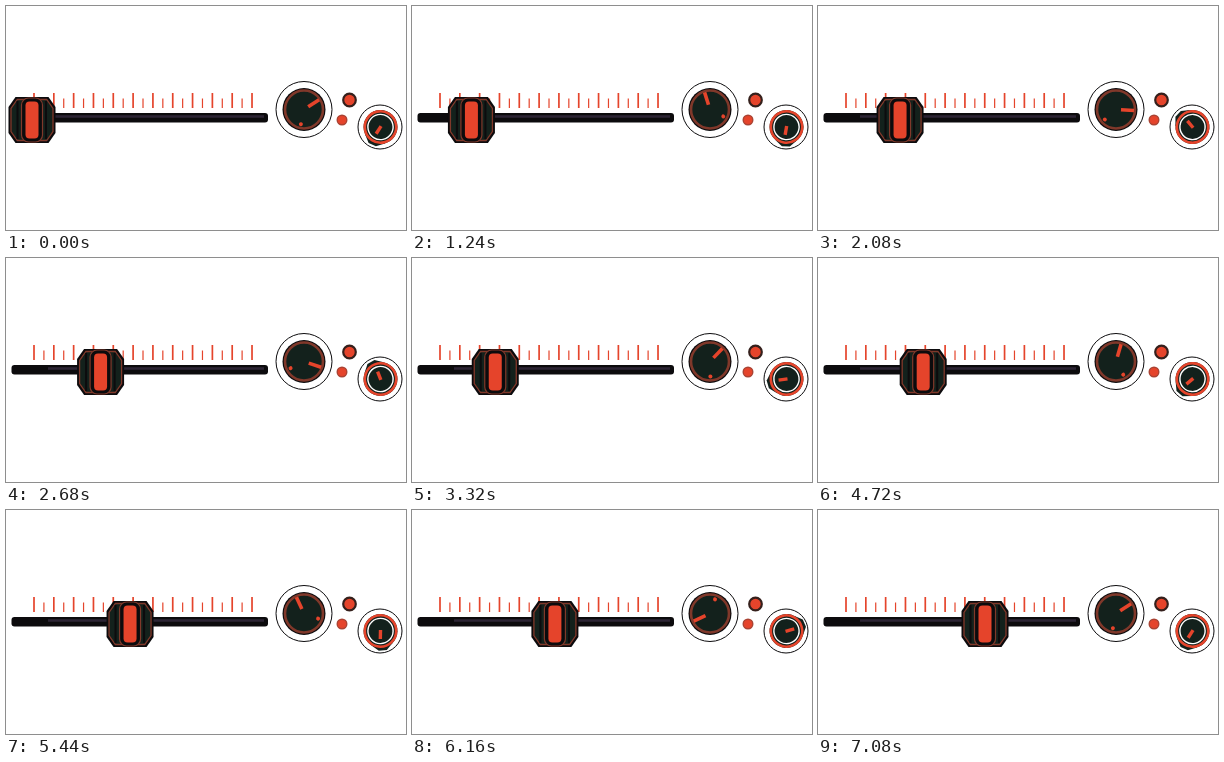
Animation, 400 px wide and 224 px high, one loop 7440 ms. Source, as an HTML page with a canvas:

```html
<!DOCTYPE html>
<html lang="en">
<head>
<meta charset="utf-8">
<title>Slider and dials</title>
<style>
html, body { margin: 0; width: 100%; height: 100%; overflow: hidden; background: #fff; }
canvas { display: block; }
</style>
</head>
<body>
<canvas id="stage" width="400" height="224"></canvas>
<script>
const ctx = document.getElementById('stage').getContext('2d');
const LOOP = 7440, STEP = 40, END = 7080, TURN = 2560, REST = 3720;
const RED = '#e5442b', DARK = '#13211c', INK = '#0c0b0d', BROWN = '#80382a';
const TAU = Math.PI * 2;

const lerp = (a, b, u) => a + (b - a) * u;
const swing = u => (1 - Math.cos(Math.PI * u)) / 2;

// Slider centre: forward, a short way back, then forward to the end.
function sliderX(t) {
  if (t < TURN) return lerp(26.5, 95.5, t / TURN);
  if (t < REST) return lerp(95.5, 79.5, swing((t - TURN) / (REST - TURN)));
  return lerp(79.5, 167.5, (t - REST) / (END - REST));
}

// Dial turn in degrees: winds up, backs off, waits, unwinds.
function dialTurn(t) {
  const fall = 4480;
  if (t < TURN) return 414 * Math.sin(Math.PI / 2 * t / TURN);
  if (t < REST) return lerp(414, 322, swing((t - TURN) / (REST - TURN)));
  if (t < fall) return 322;
  return 322 * (1 - ((t - fall) / (END - fall)) ** 2);
}

function paint(fill, stroke, width = 1) {
  if (fill) { ctx.fillStyle = fill; ctx.fill(); }
  if (stroke) { ctx.strokeStyle = stroke; ctx.lineWidth = width; ctx.stroke(); }
}

function disc(x, y, r, fill, stroke, width) {
  ctx.beginPath();
  ctx.arc(x, y, r, 0, TAU);
  paint(fill, stroke, width);
}

function pill(x, y, w, h, r, fill, stroke, width) {
  ctx.beginPath();
  ctx.roundRect(x, y, w, h, r);
  paint(fill, stroke, width);
}

function poly(points, fill, stroke, width) {
  ctx.beginPath();
  points.forEach(([x, y]) => ctx.lineTo(x, y));
  ctx.closePath();
  paint(fill, stroke, width);
}

function line(x1, y1, x2, y2, color, width, cap = 'butt') {
  ctx.beginPath();
  ctx.moveTo(x1, y1);
  ctx.lineTo(x2, y2);
  ctx.lineCap = cap;
  paint(null, color, width);
}

function at(x, y, degrees, draw) {
  ctx.save();
  ctx.translate(x, y);
  ctx.rotate(degrees * Math.PI / 180);
  draw();
  ctx.restore();
}

function octagon(w, h, cut, fill, stroke, width) {
  const c = h - cut, b = w - cut * .7;
  poly([[-b, -h], [b, -h], [w, -c], [w, c], [b, h], [-b, h], [-w, c], [-w, -c]], fill, stroke, width);
}

function scale() {
  for (let i = 0; i < 23; i++) {
    const x = 28 + i * 9.91;
    line(x, i % 2 ? 92.5 : 87, x, 102, RED, i % 2 ? 1.2 : 1.7);
  }
  pill(5.5, 107, 256.5, 9.5, 3, INK);
  line(42, 110.5, 258, 110.5, '#2c2434', 2.5);
}

function handle() {
  octagon(23.5, 23, 10, INK);
  octagon(21, 20.5, 9, DARK, BROWN, 1.3);
  for (const x of [-14.5, 14]) line(x, -19, x, 19, INK, 2);
  pill(-10.5, -22, 21, 44, 7, INK, BROWN, 1.2);
  pill(-6.5, -18.5, 13, 37, 4, RED);
}

function bigDial(turn) {
  disc(298, 103.5, 28, '#fff', INK, 1);
  disc(298, 103.5, 21.5, INK);
  disc(298, 103.5, 19, DARK, BROWN, 2.6);
  at(298, 103.5, 57 + turn, () => {
    line(0, -5, 0, -18, RED, 3.6);
    at(0, 0, 135, () => disc(0, -15, 2, RED));
  });
}

function smallDial(turn) {
  disc(374, 121, 22, '#fff', INK, 1);
  at(374.5, 121, 213 + turn, () => {
    at(0, 0, -8, () => poly([[-11, -13], [-4, -19.5], [4, -19.5], [11, -13]], DARK));
    disc(0, 0, 17, DARK);
    disc(0, 0, 15.7, null, RED, 2.6);
    disc(0, 0, 12.6, DARK, '#fff', 1.4);
    line(0, 1, 0, -8, RED, 3.4);
  });
}

function lamps() {
  disc(343.5, 94, 6.3, RED, '#35201c', 2.2);
  disc(336, 114, 4.8, RED, '#a94333', 1.4);
}

function draw(now) {
  const t = Math.min(Math.floor(now % LOOP / STEP) * STEP, END);
  const turn = dialTurn(t);
  ctx.fillStyle = '#fff';
  ctx.fillRect(0, 0, 400, 224);
  scale();
  at(sliderX(t) - .5, 114, 0, handle);
  bigDial(turn);
  smallDial(turn * 1.18);
  lamps();
}

const start = performance.now();
function tick() {
  draw(performance.now() - start);
  requestAnimationFrame(tick);
}
tick();
</script>
</body>
</html>
```
